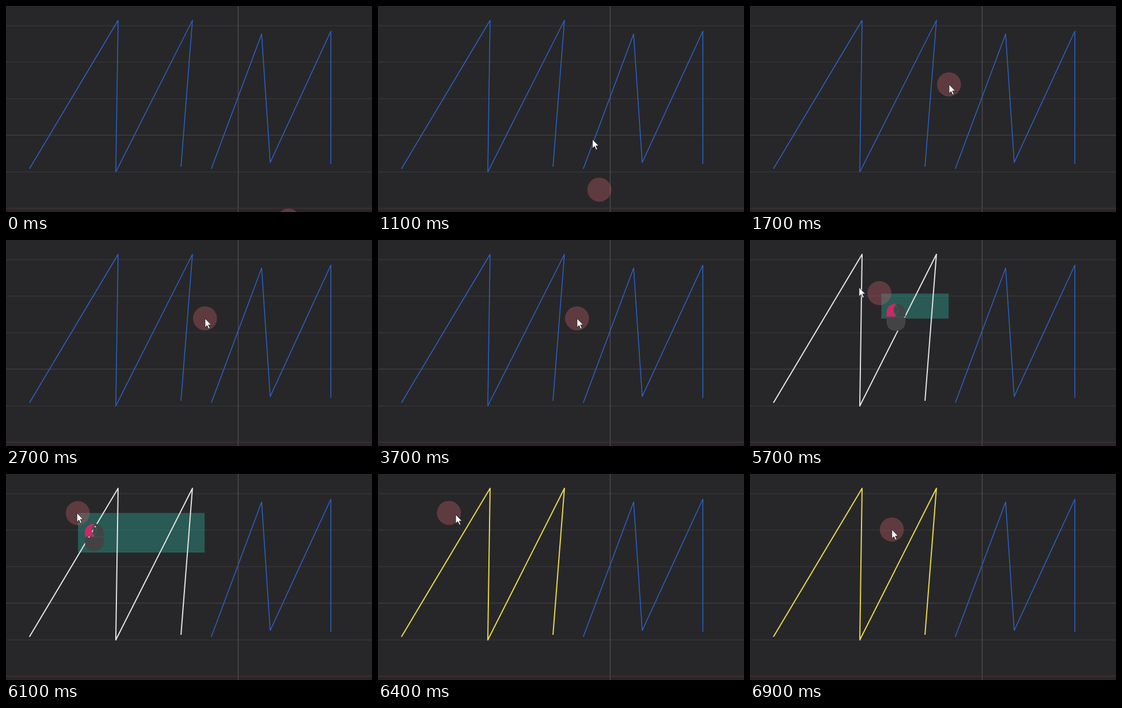
These frames come from a looping animation (640 px wide and 360 px high, 8 s). An HTML page:

```html
<!DOCTYPE html>
<html lang="en">
<head>
<meta charset="utf-8">
<title>Box selection</title>
<style>
  html, body { margin: 0; width: 100%; height: 100%; overflow: hidden; background: #272729; }
  svg { display: block; width: 100vw; height: 100vh; }
  polyline { fill: none; stroke-linejoin: round; }
</style>
</head>
<body>
<svg viewBox="0 0 640 360">
  <rect width="640" height="360" fill="#272729"/>
  <g fill="none" stroke-width="1.3">
    <path stroke="#353537" d="M0 34.5H640M0 98H640M0 162H640M0 290H640"/>
    <path stroke="#434345" d="M0 225.7H640"/>
    <path stroke="#49494b" stroke-width="1.6" d="M406 0V360"/>
    <path stroke="#452f33" d="M0 353.5H640"/>
  </g>
  <rect id="box" fill="#2ea091" fill-opacity=".42" stroke="#2ea091" stroke-opacity=".2" stroke-width="1"/>
  <polyline id="left" points="41,284.5 196,25 192,290 326,25 306,281"/>
  <polyline points="359,284.5 447,49 462,273.5 568,44 568,276" stroke="#2d62c8" stroke-width="1.5"/>
  <circle id="halo" r="21" fill="#b45a62" fill-opacity=".4"/>
  <g id="mouse">
    <path fill="#cb2967" d="M-1 -23.5C-11 -23 -16.5 -16 -16.5 -8V-1H-1V-4.5C-5.5 -6 -5.5 -19 -1 -20Z"/>
    <path fill="#434346" d="M1 -23.5C11 -23 16.5 -16 16.5 -8V-1H1V-4.5C5.5 -6 5.5 -19 1 -20Z"/>
    <rect x="-2.2" y="-17.5" width="4.4" height="10.5" rx="2.2" fill="#434346"/>
    <path fill="#434346" d="M-16.5 .8H16.5V8C16.5 18 10 24 0 24S-16.5 18 -16.5 8Z"/>
  </g>
  <path id="cursor" fill="#fff" stroke="#18181a" stroke-width=".9"
    d="M0 0V15.8L3.6 12.4L6.2 18.3L8.7 17.2L6.1 11.4H11Z"/>
</svg>
<script>
  const LOOP = 8000, STEP = 100, LAG = 100;
  const PRESS = 5100, RELEASE = 6300;
  const ANCHOR = [347, 137], CORNER = [124, 68], REST = [248, 97];

  // pointer entering the stage: one point per step, starting at 700 ms
  const ENTRY = [
    [494, 375], [482, 372], [430, 356], [387, 321], [375, 233],
    [362, 182], [352, 157], [345, 146], [342, 139], [348, 137]
  ];

  const $ = id => document.getElementById(id);
  const box = $("box"), left = $("left"), halo = $("halo"), mouse = $("mouse"), cursor = $("cursor");

  const clamp = v => Math.min(1, Math.max(0, v));
  const ease = (t, from, to) => (1 - Math.cos(Math.PI * clamp((t - from) / (to - from)))) / 2;
  const mix = (a, b, px, py = px) => [a[0] + (b[0] - a[0]) * px, a[1] + (b[1] - a[1]) * py];

  function entry(t) {
    const pos = Math.min(ENTRY.length - 1, Math.max(0, (t - 700) / STEP));
    const i = Math.min(ENTRY.length - 2, Math.floor(pos));
    return mix(ENTRY[i], ENTRY[i + 1], pos - i);
  }

  function pointer(t) {
    if (t < PRESS) return entry(t);
    if (t < RELEASE) {
      const p = ease(t, PRESS, 6050);
      return mix(ANCHOR, CORNER, p, p + 0.4 * p * (1 - p));
    }
    return mix(CORNER, REST, ease(t, RELEASE, 6800));
  }

  function place(el, [x, y]) {
    el.setAttribute("transform", `translate(${x.toFixed(2)} ${y.toFixed(2)})`);
  }

  function show(el, on) {
    el.setAttribute("visibility", on ? "visible" : "hidden");
  }

  function set(el, attrs) {
    for (const key in attrs) el.setAttribute(key, attrs[key]);
  }

  function draw(time) {
    const t = Math.floor((time % LOOP) / STEP) * STEP;
    const trail = pointer(t - LAG);
    const dragging = t > PRESS && t < RELEASE;
    const [x, y] = pointer(t - LAG - 10);

    place(cursor, pointer(t));
    place(halo, trail);
    place(mouse, [trail[0] + 29, trail[1] + 42]);
    show(mouse, dragging);
    show(box, dragging);
    if (dragging) {
      set(box, { x, y, width: Math.max(0, ANCHOR[0] - x), height: Math.max(0, ANCHOR[1] - y) });
    }

    const touched = dragging && x < 317;
    const picked = t >= RELEASE;
    set(left, {
      stroke: picked ? "#e8d84e" : touched ? "#e4e4e4" : "#2d62c8",
      "stroke-width": picked || touched ? 2 : 1.5
    });
  }

  function tick() {
    draw(performance.now());
    requestAnimationFrame(tick);
  }
  tick();
</script>
</body>
</html>
```
